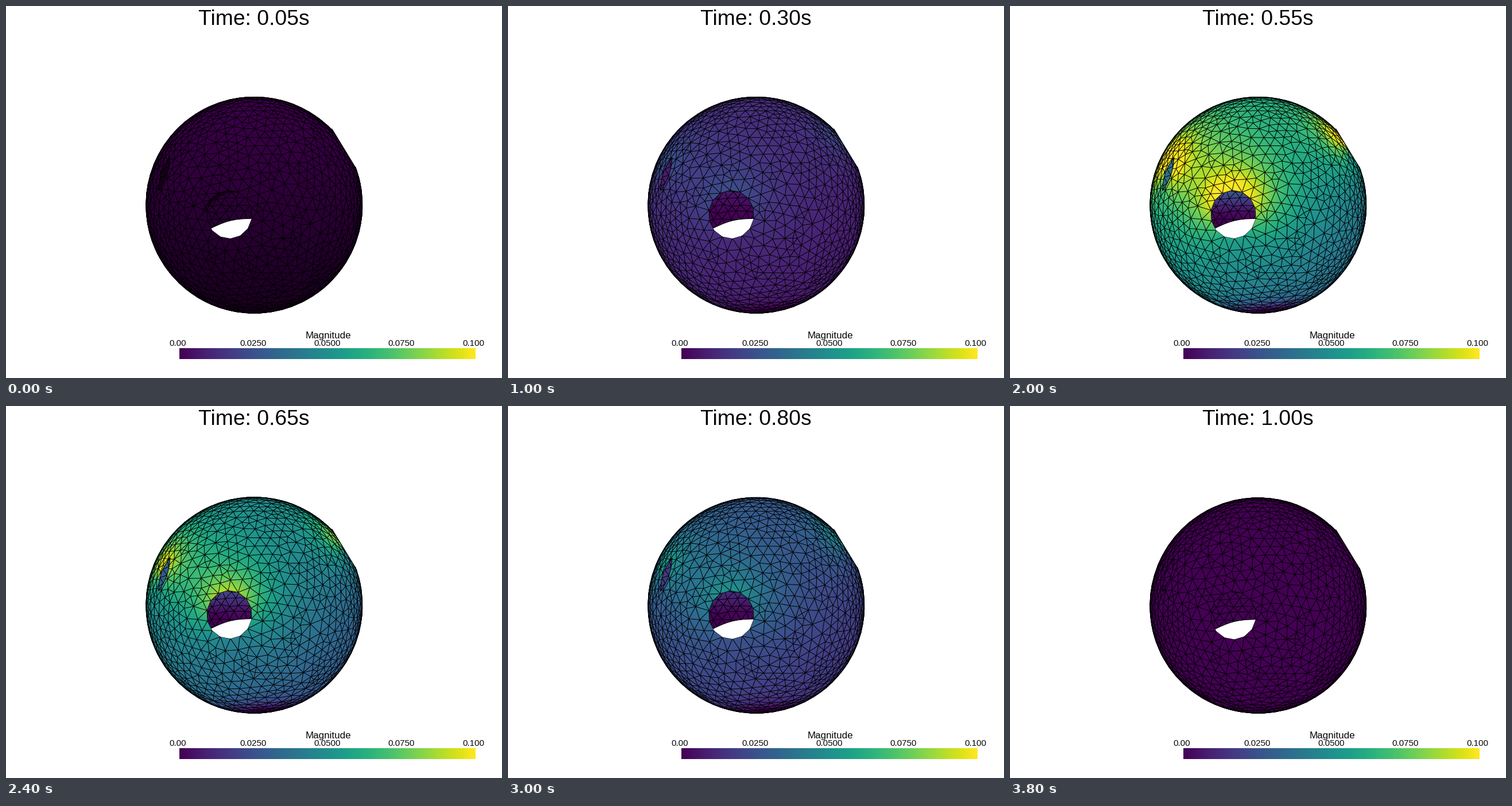
A matplotlib script for the animation above (4000 ms loop, 864 by 648 pixels).

```python
import numpy as np
import matplotlib.pyplot as plt
from matplotlib.animation import FuncAnimation
from matplotlib.collections import LineCollection
from matplotlib.patches import Circle, Polygon
from matplotlib.tri import Triangulation

W, H, DPI = 864, 648, 100
FRAMES, STEP = 20, 200
CX, CY, R = 432.3, 346.8, 188.5
CAM = 6.5                                # camera distance in sphere radii
FOCAL = R * np.sqrt(CAM**2 - 1)
PT = 72 / DPI
HOLE, HOLE_R = np.array([389, 363]), np.array([39.5, 42])
LEFT_HOLE, RIGHT_HOLE = (268, 297), (586, 249)
rng = np.random.default_rng(4)


def project(p):
    k = FOCAL / (CAM - p[:, 2])
    return np.column_stack([CX + p[:, 0] * k, CY - p[:, 1] * k])


def unproject(xy):
    """Stage pixels to points on the visible side of the unit sphere."""
    u = (np.atleast_2d(xy) - (CX, CY)) / FOCAL * (1, -1)
    q = 1 + (u**2).sum(1)
    w = (CAM - np.sqrt(np.maximum(CAM**2 - q * (CAM**2 - 1), 0))) / q
    return np.column_stack([u * w[:, None], CAM - w])


def unit(p):
    return p / np.linalg.norm(p, axis=1)[:, None]


def warp(xy, t):
    """Slight sag of the upper part during the release phase."""
    s = 1.5 * max(0, t - 0.55) / 0.45
    out = np.array(xy, float)
    out[:, 1] += s * np.clip((CY + R - out[:, 1]) / 95, 0, 1)
    return out


def load(t):
    """Slow ramp, a jump after half time, then a linear release."""
    return 0.85 * (t - 0.05) if t < 0.525 else (1 - t) / 0.45


def delaunay(p):
    """Spherical Delaunay through a stereographic projection."""
    return Triangulation(p[:, 0] / (1 + p[:, 2]), p[:, 1] / (1 + p[:, 2]))


def ellipse(center, radii, n, start=0):
    a = start + np.arange(n) * 2 * np.pi / n
    return center + radii * np.column_stack([np.cos(a), np.sin(a)])


def arc(a, b, bulge, n=9):
    """Shallow curve from a to b, bowed to the left of its direction."""
    a, b = np.array(a, float), np.array(b, float)
    s = np.linspace(0, 1, n)[:, None]
    dx, dy = b - a
    normal = np.array([dy, -dx]) / np.hypot(dx, dy)
    return a + (b - a) * s + normal * bulge * np.sin(np.pi * s)


def crescent(a, b, outer, inner):
    return np.vstack([arc(a, b, outer), arc(a, b, inner)[::-1]])


# --- sphere mesh with a round opening ---
rim = ellipse(HOLE, HOLE_R, 14, np.radians(10))


def sphere_points(n=1900, jitter=0.035):
    i = np.arange(n)
    z = 1 - (2 * i + 1) / n
    a = i * np.pi * (3 - np.sqrt(5))
    r = np.sqrt(1 - z**2)
    p = np.column_stack([r * np.cos(a), r * np.sin(a), z])[z > -0.35]
    p = unit(p + rng.uniform(-jitter, jitter, p.shape))
    near = (((project(p) - HOLE) / HOLE_R)**2).sum(1) < 1.5
    return np.vstack([unproject(rim), p[~(near & (p[:, 2] > 0))]])


def relax(p, rounds=5):
    fixed = (np.arange(len(p)) < len(rim)) | (p[:, 2] < -0.22)
    for _ in range(rounds):
        e = delaunay(p).edges
        e = np.vstack([e, e[:, ::-1]])
        total = np.zeros_like(p)
        np.add.at(total, e[:, 0], p[e[:, 1]])
        p = np.where(fixed[:, None], p, unit(total))
    return p


nodes = relax(sphere_points())
faces = delaunay(nodes).triangles
faces = faces[(nodes[faces, 2].mean(1) > 0.15) & (faces >= len(rim)).any(1)]


def rim_stress(center):
    """Peaks along the upper rim of an opening and fades outwards."""
    d = nodes - unproject(center)
    dist = np.linalg.norm(d, axis=1) + 1e-9
    upward = 0.55 + 0.45 * d[:, 1] / dist
    return 0.06 * upward * np.exp(-np.maximum(dist - 0.2, 0) / 0.25)


foot = ((nodes - unproject((445, 534)))**2).sum(1)
field = (0.049 + 0.009 * nodes[:, 1] - 0.009 * nodes[:, 0]
         - 0.05 * np.exp(-foot / 0.3**2)
         + sum(rim_stress(c) for c in (HOLE, LEFT_HOLE, RIGHT_HOLE)))

# --- far wall seen through the opening ---
gx, gy = np.meshgrid(np.arange(335, 446, 16.0), np.arange(308, 410, 13.0))
gx[1::2] += 8
wall = np.column_stack([gx.ravel(), gy.ravel()])
wall += rng.uniform(-3, 3, wall.shape)
wall_faces = Triangulation(*wall.T).triangles
wall_field = 0.028 * np.clip((364 - wall[:, 1]) / 42, 0, 1)

fig = plt.figure(figsize=(W / DPI, H / DPI), dpi=DPI, facecolor="white")
ax = fig.add_axes([0, 0, 1, 1])
ax.axis("off")


class Mesh:
    def __init__(self, xy, tris, values, z):
        self.xy, self.values = xy, values
        self.tri = Triangulation(xy[:, 0].copy(), xy[:, 1].copy(), tris)
        self.fill = ax.tripcolor(self.tri, values, shading="gouraud",
                                 cmap="viridis", vmin=0, vmax=0.1, zorder=z)
        self.lines = LineCollection([], colors="black", linewidths=PT,
                                    zorder=z + 0.5)
        ax.add_collection(self.lines)

    def update(self, t):
        p = warp(self.xy, t)
        self.tri.x[:], self.tri.y[:] = p.T
        self.fill.set_array(self.values * load(t))
        self.lines.set_segments(p[self.tri.edges])


meshes = [Mesh(wall, wall_faces, wall_field, 1),
          Mesh(project(nodes), faces, field, 2)]
moving = []


def polygon(pts, **kw):
    pts = np.array(pts, float)
    patch = ax.add_patch(Polygon(pts, **kw))
    moving.append((patch, pts))
    return patch


def stroke(pts, z):
    return polygon(pts, closed=False, fill=False, ec="black", lw=PT, zorder=z)


# opening near the left limb
tip, foot_pt = (286, 264), (266, 322)
lens = crescent(tip, foot_pt, 4.5, -6)
lens_patch = polygon(lens, lw=0, zorder=3)
stroke(np.vstack([lens, lens[:1]]), 3.2)
zigzag = arc(tip, foot_pt, -6)
zigzag[::2] = arc(tip, foot_pt, 4.5)[::2]
stroke(zigzag, 3.2)

stroke(ellipse((CX, CY), R - 0.3, 181), 3.5)

# gap in the far wall, and the flat cut on the upper right
edge = arc((357.4, 387), rim[0], 5)
polygon(np.vstack([edge, rim[:6]]), fc="white", lw=0, zorder=5)
stroke(edge, 5.1)
cut = np.array([(567.5, 213.5), (608, 280)])
polygon(np.vstack([cut, cut[::-1] + (18, -11)]), fc="white", lw=0, zorder=5)
stroke(cut, 5.1)

# dim lighting of the resting state
dim = np.zeros((256, 1, 4))
dim[:, 0, 3] = np.linspace(0.1, 0.62, 256)
shade = ax.imshow(dim, extent=(CX - R, CX + R, CY + R, CY - R),
                  aspect="auto", zorder=4)
shade.set_clip_path(Circle((CX, CY), R, transform=ax.transData))
shadows = [shade] + [
    polygon(pts, fc="black", alpha=0.55, lw=0, zorder=4.2)
    for pts in (crescent((340, 364), (398, 322), 14, 7), lens)]

# --- colour bar and labels ---
BAR = (302, 817.5)
ax.imshow(np.linspace(0, 1, 256)[None], cmap="viridis", aspect="auto",
          extent=(*BAR, 615, 596), zorder=1)


def label(x, y, s, px):
    return ax.text(x, y, s, size=px * PT, family="Liberation Sans",
                   color="#050508", ha="center", va="baseline", zorder=6)


title = label(431.5, 33, "", 37.2)
label(561.5, 579, "Magnitude", 17)
for k, x in enumerate(np.linspace(*BAR, 5)):
    label(x - 3 * (k % 4 == 0), 591.5, f"{k * 0.025:#.3g}", 15)

ax.set_xlim(0, W)
ax.set_ylim(H, 0)


def update(i):
    t = 0.05 * (i + 1)
    title.set_text(f"Time: {t:.2f}s")
    for m in meshes:
        m.update(t)
    for patch, pts in moving:
        patch.set_xy(warp(pts, t))
    lens_patch.set_facecolor(plt.cm.viridis(0.36 * load(t)))
    for s in shadows:
        s.set_visible(i == 0)
    return []


anim = FuncAnimation(fig, update, frames=FRAMES, interval=STEP,
                     repeat=True, repeat_delay=0, blit=False)
plt.show()
```
